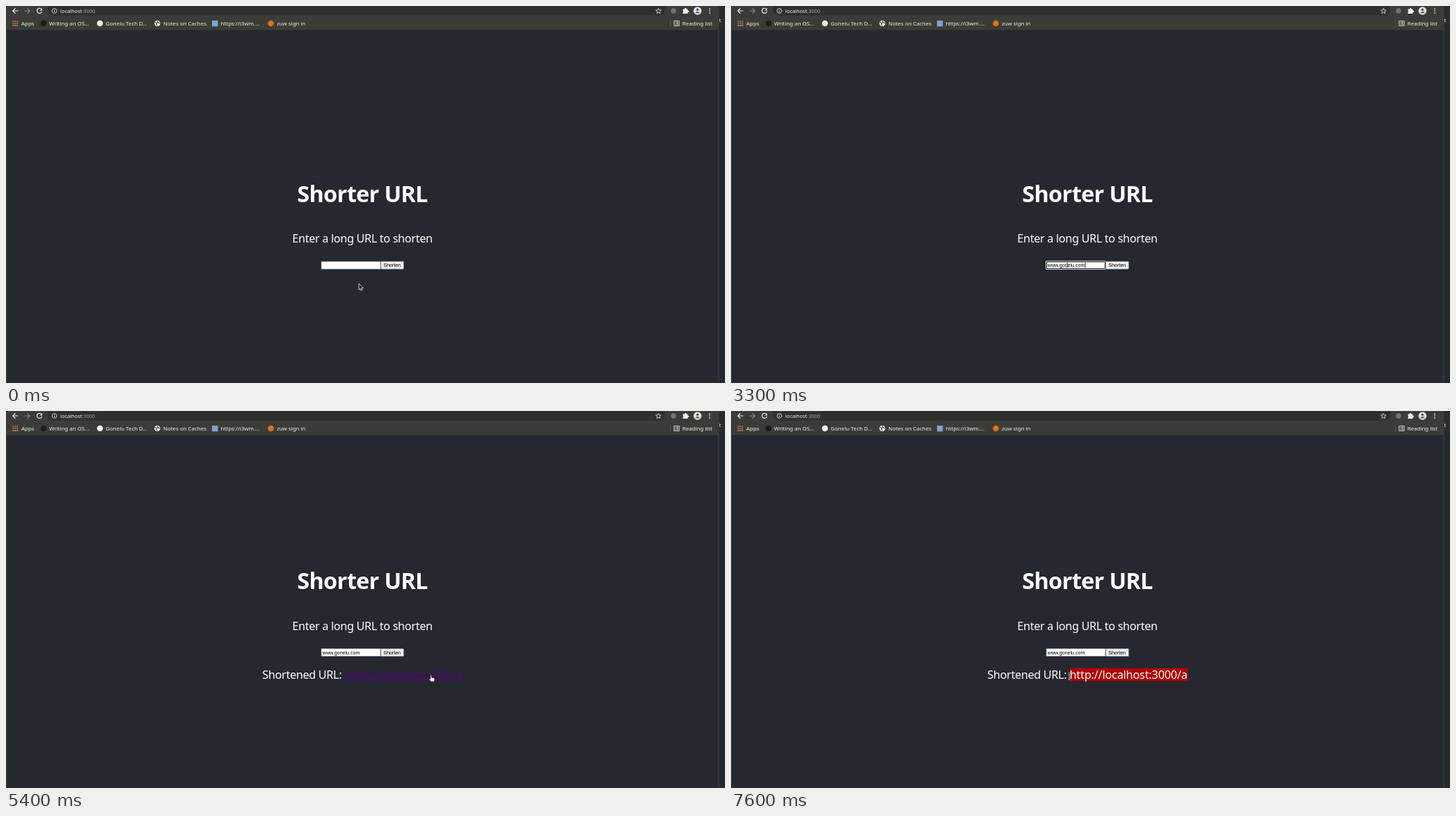
Recreate the animation shown at these times as an HTML page. Size 1033x542 px, loop 8 s.

```html
<!DOCTYPE html>
<html lang="en">
<head>
<meta charset="utf-8">
<title>Shorter URL</title>
<style>
  html, body { margin: 0; width: 100%; height: 100%; overflow: hidden; background: #262830; }
  svg { display: block; width: 1033px; height: 542px; }
  text { fill: #fff; white-space: pre; }
  .bar text { font: 7.9px "Noto Sans", sans-serif; fill: #f2f2ee; }
  .bar .address { font-size: 7.4px; }
  .line { fill: none; stroke: #f2f2ee; stroke-width: 1.2; }
  .page { font: 16.2px "Noto Sans", sans-serif; letter-spacing: -.32px; }
  .title { font-size: 32.5px; font-weight: 700; letter-spacing: -.68px; }
  .link { letter-spacing: -.16px; }
  .form text { font: 7.1px "Liberation Sans", Arial, sans-serif; letter-spacing: 0; fill: #000; }
</style>
</head>
<body>
<svg viewBox="0 0 1033 542">
  <defs>
    <clipPath id="selectedArea"><rect id="clip" y="365" width="200" height="30"/></clipPath>
  </defs>

  <rect width="1033" height="542" fill="#262830"/>

  <g class="bar">
    <rect width="1024" height="34.5" fill="#3c3c37"/>
    <rect x="60" y="-8" width="887" height="21.5" rx="8" fill="#2f302c"/>
    <rect x="1025" width="8" height="29" fill="#2b2b28"/>
    <text x="1024.5" y="23">t</text>
    <path d="M.7 34V542M1024 0V542" stroke="#3a3a36" stroke-width="1.4"/>
    <path d="M0 541H1025" stroke="#2c2d2f"/>

    <path class="line" d="M17.5 7H10M13.5 3.2L9.8 7L13.5 10.8"/>
    <path class="line" d="M26.5 7H34M30.5 3.2L34.2 7L30.5 10.8" style="stroke:#85857f"/>
    <path class="line" d="M51 4.6A3.6 3.6 0 1 0 51.6 8"/>
    <path d="M52 3V6.4H48.6Z" fill="#f2f2ee"/>
    <circle class="line" cx="69.5" cy="7" r="3.4" style="stroke-width:.8"/>
    <path class="line" d="M69.5 6.4V9M69.5 4.8V5.6" style="stroke-width:.9"/>
    <text class="address" x="78" y="9.7">localhost<tspan fill="#a5a59f">:3000</tspan></text>
    <path class="line" d="M937.4 3.2L938.5 5.8L941.2 6L939.1 7.9L939.8 10.6L937.4 9.1L935 10.6L935.7 7.9L933.6 6L936.3 5.8Z" style="stroke-width:.8"/>
    <circle cx="959" cy="7" r="3.8" fill="#77706e"/>
    <path d="M972.5 4.5H975A1.3 1.3 0 1 1 977.5 4.5H979.5V6.5A1.3 1.3 0 1 1 979.5 9V11H972.5V8.8A1.3 1.3 0 0 0 972.5 6.4Z" fill="#f2f2ee"/>
    <circle cx="993.5" cy="7" r="5.8" fill="#dfe3ea"/>
    <path d="M990 10.2Q993.5 5.8 997 10.2Z" fill="#4a5365"/>
    <circle cx="993.5" cy="5.2" r="1.8" fill="#4a5365"/>
    <path d="M1011 3.4v1.5M1011 6.3v1.5M1011 9.2v1.5" stroke="#f2f2ee" stroke-width="1.5"/>

    <g stroke-width="1.9" stroke-dasharray="1.9 1">
      <path d="M9.5 22.2h8" stroke="#e0564b"/>
      <path d="M9.5 25.1h8" stroke="#5b9a68"/>
      <path d="M9.5 28h8" stroke="#cf8a4a"/>
    </g>
    <circle cx="54" cy="25" r="4.3" fill="#1b1b19"/>
    <circle cx="135" cy="25" r="4.3" fill="#f4f2f0"/>
    <circle cx="217.4" cy="25" r="4.2" fill="#f2f2ee"/>
    <path d="M214 23.5L217 24.5L216 26.5L217.5 28.5M217.5 21.5L218 23.5L220.8 24.6" fill="none" stroke="#3c3c37" stroke-width="1.2"/>
    <rect x="296" y="21" width="8.4" height="8.4" fill="#79a3d6"/>
    <circle cx="380.5" cy="25" r="4.3" fill="#e2701c"/>
    <text x="22" y="27.6">Apps</text>
    <text x="62" y="27.6">Writing an OS…</text>
    <text x="143.3" y="27.6">Gonelu Tech D…</text>
    <text x="226" y="27.6">Notes on Caches</text>
    <text x="308.6" y="27.6">https://i3wm.…</text>
    <text x="389" y="27.6">zuw sign in</text>
    <path d="M954.5 20V30" stroke="#55554f"/>
    <path class="line" d="M959.8 21.5h7.4v7h-7.4zM961 23.3h1M963 23.3h3M961 25h1M963 25h3M961 26.7h1M963 26.7h3" style="stroke-width:.8"/>
    <text x="971.8" y="27.6">Reading list</text>
  </g>

  <g class="page">
    <g id="content">
      <text class="title" x="512" y="281.5" text-anchor="middle">Shorter URL</text>
      <text x="512" y="340.3" text-anchor="middle">Enter a long URL to shorten</text>
      <g class="form">
        <rect x="453" y="367.2" width="85" height="11" fill="#fff" stroke="#77777b" stroke-width=".6"/>
        <g id="focus" fill="none">
          <rect x="452.5" y="366.8" width="85.6" height="11.7" rx="1.2" stroke="#fff" stroke-width=".9"/>
          <rect x="453.4" y="367.8" width="83.9" height="9.8" rx=".6" stroke="#101010"/>
        </g>
        <text id="typed" x="454.8" y="375.3"></text>
        <path id="spelling" d="M455 376.7H509" stroke="#e0405a" stroke-width=".9" opacity=".8"/>
        <rect id="caret" y="368.8" width=".8" height="7.8"/>
        <rect id="button" x="538.6" y="367.2" width="32.8" height="11" rx=".8" stroke="#77777b" stroke-width=".6"/>
        <text x="542.2" y="375.3">Shorten</text>
      </g>
    </g>
    <g id="result">
      <text x="368.3" y="384.6">Shortened URL:</text>
      <text class="link" id="link" x="486.5" y="384.6" style="fill:#4f0a78" text-decoration="underline">http://localhost:3000/a</text>
      <rect id="selection" y="369.8" height="18.4" fill="#b00000"/>
      <text class="link" x="486.5" y="384.6" clip-path="url(#selectedArea)">http://localhost:3000/a</text>
    </g>
  </g>

  <g id="cursor">
    <path id="arrow" d="M0 0V9L2 7.2L3.4 10.2L5 9.5L3.6 6.6L6.2 6.4Z" fill="#15161a" stroke="#fff" stroke-width=".8"/>
    <g id="beam" fill="none">
      <path d="M-1.6 -4.4Q0 -4.4 0 -3.4V3.4Q0 4.4 -1.6 4.4M1.6 -4.4Q0 -4.4 0 -3.4M0 3.4Q0 4.4 1.6 4.4" stroke="#ddd" stroke-width="1.8"/>
      <path d="M-1.6 -4.4Q0 -4.4 0 -3.4V3.4Q0 4.4 -1.6 4.4M1.6 -4.4Q0 -4.4 0 -3.4M0 3.4Q0 4.4 1.6 4.4" stroke="#222" stroke-width=".9"/>
    </g>
    <path id="hand" d="M.2 0Q1.3 -.6 1.6 .6V3.2L5.2 4Q6.2 4.3 6 5.4L5.3 9H.8L-1.8 5.6Q-1.6 4.6 -.4 5.3L.2 5.8Z" fill="#fff" stroke="#222" stroke-width=".5"/>
  </g>
</svg>

<script>
const LOOP = 8000, STEP = 100;
const $ = id => document.getElementById(id);
const show = (id, on) => $(id).style.display = on ? "" : "none";

const address = "www.gonelu.com";
// [time, number of typed characters]
const typing = [[2000, 1], [2100, 2], [2300, 3], [2600, 6], [2700, 7], [2900, 8],
                [3000, 10], [3100, 11], [3200, 13], [3300, 14]];

// [time, x, y, shape]
const pointer = [
  [0, 507, 399, "arrow"], [500, 507, 399, "arrow"], [800, 487, 376, "beam"], [900, 483, 371, "beam"],
  [3800, 483, 371, "beam"], [4000, 540, 374, "arrow"], [4100, 569, 376, "arrow"], [4200, 568, 373, "arrow"],
  [4800, 569, 372.5, "hand"], [5000, 569, 372.5, "hand"], [5200, 533, 378, "hand"], [5500, 648, 381, "hand"],
  [5600, 648, 381, "hand"], [5800, 671, 383, "arrow"], [5900, 658, 381, "beam"], [6000, 640, 379, "beam"],
  [6500, 506, 381, "beam"], [6900, 486, 381, "beam"], [7300, 486, 381, "beam"],
  [7500, 484.5, 381, "beam"], [7600, 486, 381, "beam"]
];
// [time, left edge of the selection]
const selecting = [[5800, 656], [6000, 623], [6500, 502], [6800, 486.5]];

function sample(keys, t) {
  const next = keys.findIndex(k => k[0] > t);
  if (next === 0) return keys[0];
  if (next < 0) return keys[keys.length - 1];
  const a = keys[next - 1], b = keys[next];
  const p = (t - a[0]) / (b[0] - a[0]);
  return a.map((v, i) => typeof v === "number" ? v + (b[i] - v) * p : v);
}

function snapToCharacter(x) {
  const link = $("link"), count = link.getNumberOfChars();
  let best = link.getEndPositionOfChar(count - 1).x;
  for (let i = 0; i < count; i++) {
    const edge = link.getStartPositionOfChar(i).x;
    if (Math.abs(edge - x) < Math.abs(best - x)) best = edge;
  }
  return best;
}

function draw(t) {
  const shortened = t >= 4800;
  $("content").setAttribute("transform", `translate(0 ${shortened ? -25.5 : 0})`);
  show("result", shortened);

  const typed = typing.filter(k => k[0] <= t).pop();
  $("typed").textContent = address.slice(0, typed ? typed[1] : 0);
  $("caret").setAttribute("x", 455 + (typed ? $("typed").getComputedTextLength() : 0));
  show("focus", t >= 1300 && t < 4500);
  show("caret", t >= 1300 && t < 4400 && (t < 1800 || t >= 2000));
  show("spelling", t >= 4400 && t < 4500);
  $("button").setAttribute("fill", t >= 4000 && t < 4800 ? "#e2e2e6" : "#efefef");

  const selected = t >= 5900;
  show("selection", selected);
  if (shortened) {
    const left = selected ? snapToCharacter(sample(selecting, t)[1]) : 700;
    $("selection").setAttribute("x", left);
    $("selection").setAttribute("width", Math.max(0, 656.2 - left));
    $("clip").setAttribute("x", left);
  }

  const [, x, y, shape] = sample(pointer, t);
  $("cursor").setAttribute("transform", `translate(${x} ${y})`);
  for (const id of ["arrow", "beam", "hand"]) show(id, id === shape);
}

const start = performance.now();
function tick() {
  const t = (performance.now() - start) % LOOP;
  draw(Math.floor(t / STEP) * STEP);
  requestAnimationFrame(tick);
}
tick();
</script>
</body>
</html>
```
